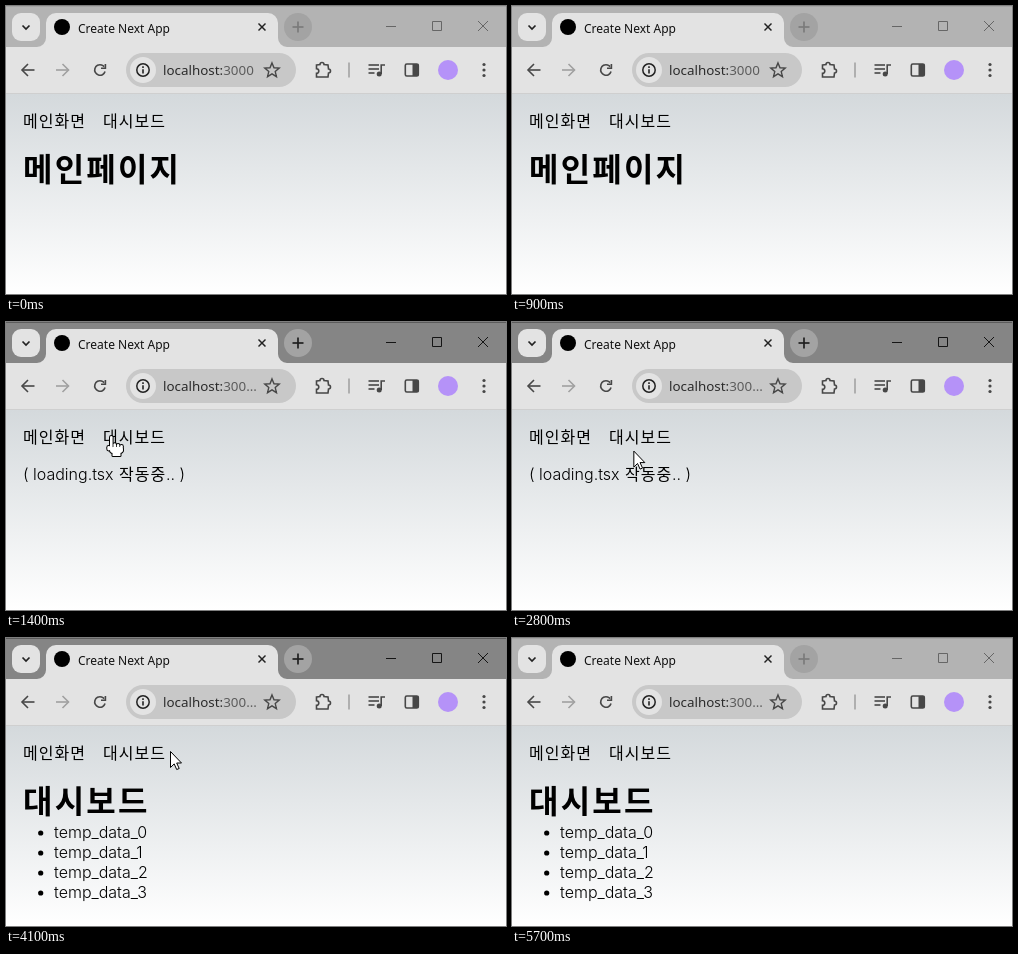
Write an HTML page with a canvas that moves like this. It is 500x288 px and loops after 5.8 s.

```html
<!DOCTYPE html>
<html lang="ko">
<head>
<meta charset="utf-8">
<title>Create Next App</title>
<style>
html, body { margin: 0; width: 100%; height: 100%; overflow: hidden; background: #fff; }
canvas { display: block; }
</style>
</head>
<body>
<canvas id="stage" width="500" height="288"></canvas>
<script>
const ctx = document.getElementById('stage').getContext('2d');
const LOOP = 5800;
const UI = '"Noto Sans", "Open Sans", sans-serif';
const LATIN = '300 16px Inter, "Liberation Sans", sans-serif';
const KOREAN = '"Noto Sans CJK KR", "Noto Sans CJK", "Noto Sans CJK JP", sans-serif';
const BODY = '300 16px ' + KOREAN;
const TITLE = 'bold 32px ' + KOREAN;
const BAR = '#e3e3e3';
const DARK = '#222';
const ICON = '#474747';

function box(x, y, w, h, r, color) {
  ctx.fillStyle = color;
  ctx.beginPath();
  ctx.roundRect(x, y, w, h, r);
  ctx.fill();
}

function disc(x, y, r, color) {
  box(x - r, y - r, 2 * r, 2 * r, r, color);
}

function frame(x, y, w, h, r, color, width) {
  ctx.strokeStyle = color;
  ctx.lineWidth = width;
  ctx.beginPath();
  ctx.roundRect(x, y, w, h, r);
  ctx.stroke();
}

function line(color, width, ...points) {
  ctx.strokeStyle = color;
  ctx.lineWidth = width;
  ctx.beginPath();
  for (const [x, y] of points) ctx.lineTo(x, y);
  ctx.stroke();
}

function cross(x, y, r, color, width) {
  line(color, width, [x - r, y - r], [x + r, y + r]);
  line(color, width, [x - r, y + r], [x + r, y - r]);
}

// dir: -1 points left, 1 points right
function navArrow(x, y, dir, color) {
  const tip = x + 6 * dir;
  line(color, 1.6, [x - 6.5 * dir, y], [tip, y]);
  line(color, 1.6, [x, y - 6], [tip, y], [x, y + 6]);
}

function text(str, x, y, font, color = '#000', tracking = 0) {
  ctx.font = font;
  ctx.letterSpacing = tracking + 'px';
  ctx.fillStyle = color;
  ctx.fillText(str, x, y);
}

const body = (str, x, y) => text(str, x, y, BODY, '#000', 1);
const title = str => text(str, 17, 175, TITLE, '#000', 2.2);

function drawTabs(active) {
  const control = active ? '#151515' : '#666';
  box(0, 0, 500, 41, 0, active ? '#858585' : '#b3b3b3');
  box(0, 0, 500, 1, 0, active ? '#5c5c5c' : '#a4a4a4');

  box(6, 7, 28, 28, 9, BAR);
  line(DARK, 1.7, [16.5, 19.5], [20, 23], [23.5, 19.5]);

  ctx.fillStyle = BAR;
  ctx.beginPath();
  ctx.moveTo(31, 41);
  ctx.arcTo(40, 41, 40, 32, 9);
  ctx.arcTo(40, 7, 50, 7, 10);
  ctx.arcTo(272, 7, 272, 17, 10);
  ctx.arcTo(272, 41, 281, 41, 9);
  ctx.fill();
  disc(56, 21, 8, '#000');
  text('Create Next App', 72, 27, '300 12px ' + UI, '#111');
  cross(256, 21, 3.5, DARK, 1.5);

  const plus = active ? '#1f1f1f' : '#7b7b7b';
  disc(292, 21, 14, '#a3a3a3');
  line(plus, 1.7, [286.5, 21], [297.5, 21]);
  line(plus, 1.7, [292, 15.5], [292, 26.5]);

  line(control, 1, [380, 20.5], [390, 20.5]);
  frame(426.5, 15.5, 9, 9, 0, control, 1);
  cross(477, 20, 5, control, 1);
}

function drawStar(x, y) {
  ctx.strokeStyle = ICON;
  ctx.lineWidth = 1.4;
  ctx.beginPath();
  for (let i = 0; i < 10; i++) {
    const r = i % 2 ? 3.4 : 7.6;
    const a = (i / 5 - 0.5) * Math.PI;
    ctx.lineTo(x + r * Math.cos(a), y + r * Math.sin(a));
  }
  ctx.closePath();
  ctx.stroke();
}

function drawReload(x, y) {
  ctx.strokeStyle = ICON;
  ctx.lineWidth = 1.6;
  ctx.beginPath();
  ctx.arc(x, y, 5.3, 0.3, Math.PI * 1.78);
  ctx.stroke();
  line(ICON, 1.6, [x + 5.4, y - 6], [x + 5.4, y - 1.8], [x + 1, y - 1.8]);
}

// A square with a knob on top and on the right, and a notch on the left
function drawPuzzle(x, y) {
  ctx.strokeStyle = ICON;
  ctx.lineWidth = 1.6;
  ctx.beginPath();
  ctx.moveTo(x, y);
  ctx.arc(x + 5.5, y - 0.5, 2, Math.PI, 0);
  ctx.lineTo(x + 11.5, y);
  ctx.arc(x + 12, y + 6, 2, -Math.PI / 2, Math.PI / 2);
  ctx.lineTo(x + 11.5, y + 12);
  ctx.lineTo(x, y + 12);
  ctx.arc(x, y + 6, 2.3, Math.PI / 2, -Math.PI / 2, true);
  ctx.closePath();
  ctx.stroke();
}

function drawQueue(x, y) {
  for (let i = 0; i < 3; i++) {
    line(ICON, 1.6, [x, y + 4 * i], [x + (i < 2 ? 10.5 : 6), y + 4 * i]);
  }
  line(ICON, 1.6, [x + 12.7, y + 9], [x + 12.7, y], [x + 16.5, y]);
  disc(x + 10.7, y + 9, 2.5, ICON);
}

function drawToolbar(dashboard) {
  box(0, 41, 500, 47, 0, BAR);
  box(0, 87, 500, 1, 0, '#cfcfcf');

  navArrow(22, 64, -1, ICON);
  navArrow(56.5, 64, 1, '#a0a0a0');
  drawReload(94, 64);

  box(120, 47, 170, 34, 17, '#c8c8c8');
  disc(137, 64, 13, BAR);
  frame(130.8, 57.8, 12.4, 12.4, 6.2, DARK, 1.5);
  line(DARK, 1.6, [137, 63.2], [137, 67.4]);
  line(DARK, 1.6, [137, 60.3], [137, 61.9]);

  const font = '13.4px ' + UI;
  text('localhost:', 157, 69, font, '#2b2b2b');
  const w = ctx.measureText('localhost:').width;
  text(dashboard ? '300...' : '3000', 157 + w, 69, font, '#5c5c5c');
  drawStar(266, 64.5);

  drawPuzzle(310.5, 59);
  line('#999', 1.4, [343, 56.5], [343, 71.5]);
  drawQueue(362.5, 59);
  frame(399.3, 58, 13, 12, 1.5, ICON, 1.6);
  box(406.5, 58, 6, 12, 0, ICON);
  disc(442, 64, 10, '#b592f8');
  for (let i = -1; i < 2; i++) disc(478, 64 + 5.5 * i, 1.6, ICON);
}

function drawPage(view) {
  const sky = ctx.createLinearGradient(0, 88, 0, 288);
  sky.addColorStop(0, 'rgb(212,217,220)');
  sky.addColorStop(1, '#fff');
  box(0, 88, 500, 200, 0, sky);

  body('메인화면', 17, 121);
  body('대시보드', 97, 121);

  if (view === 'main') {
    title('메인페이지');
  } else if (view === 'loading') {
    text('( loading.tsx', 17, 158, LATIN);
    body('작동중', 113, 158);
    text('.. )', 160, 158, LATIN);
  } else {
    title('대시보드');
    for (let i = 0; i < 4; i++) {
      disc(34.7, 195 + i * 20, 2.6, '#000');
      text('temp_data_' + i, 48, 200 + i * 20, LATIN);
    }
  }
}

// Rounded parts laid over each other: a black pass, then a smaller white one
function drawHand(x, y) {
  for (const [inset, color] of [[0, '#000'], [1, '#fff']]) {
    const part = (dx, dy, w, h, r) =>
      box(x + dx + inset, y + dy + inset, w - 2 * inset, h - 2 * inset, r - inset, color);
    for (let i = 0; i < 4; i++) part(3 + 3.4 * i, i ? 7.5 + i * 0.8 : 1, 4.6, i ? 9 : 16, 2.3);
    part(0.3, 11, 5, 6.5, 2.4);
    part(3, 12, 14.8, 8, 4);
    part(5.5, 15, 10, 8, 1.5);
  }
}

function drawArrow(x, y) {
  const shape = [[0, 0], [0, 16], [3.7, 12.4], [6.2, 18], [8.7, 17], [6.2, 11.5], [11, 11.5]];
  ctx.beginPath();
  for (const [dx, dy] of shape) ctx.lineTo(x + dx, y + dy);
  ctx.closePath();
  ctx.fillStyle = '#fff';
  ctx.fill();
  ctx.strokeStyle = '#000';
  ctx.lineWidth = 1;
  ctx.stroke();
}

function drawCursor(t) {
  if (t < 1100 || t >= 4600) return;
  if (t < 2800) return drawHand(100, 112);
  // The pointer slides off the link along a shallow dip
  const p = Math.min(1, (Math.floor(t / 100) - 27) / 3);
  drawArrow(100.5 + 64 * p, 113.5 + 18 * Math.sin(Math.PI * p));
}

function draw(t) {
  const view = t < 1300 ? 'main' : t < 4100 ? 'loading' : 'dashboard';
  drawTabs(t >= 1200 && t < 5700);
  drawToolbar(view !== 'main');
  drawPage(view);
  drawCursor(t);
}

const start = performance.now();
function tick() {
  draw((performance.now() - start) % LOOP);
  requestAnimationFrame(tick);
}
tick();
</script>
</body>
</html>
```
